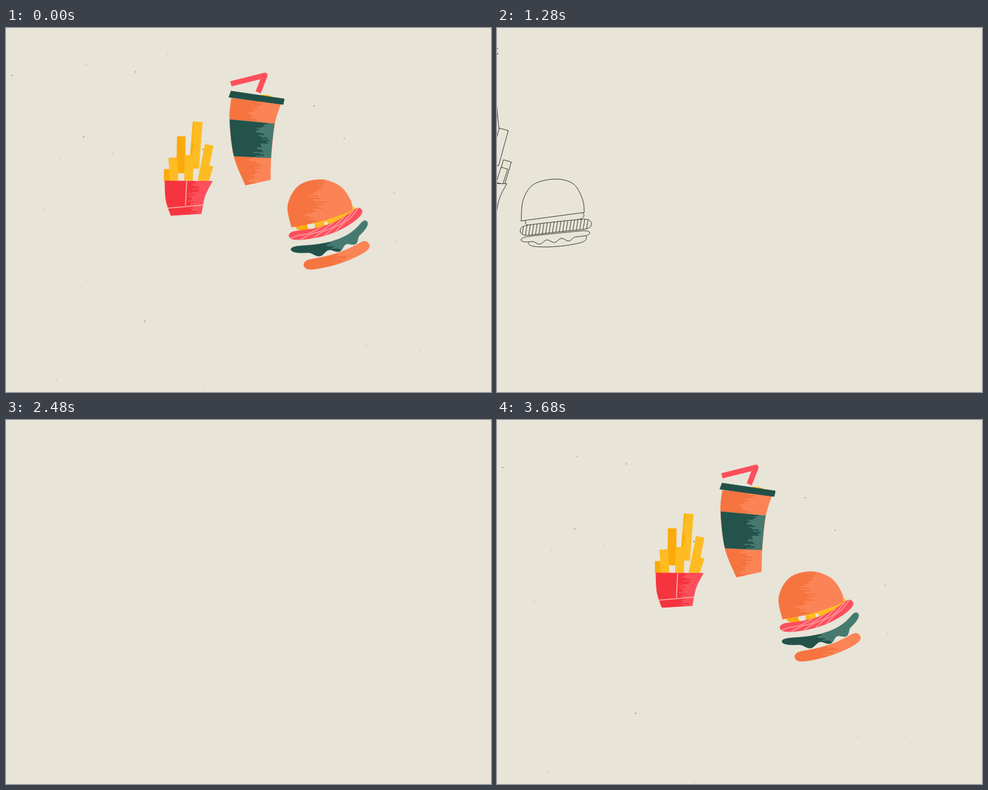
These frames come from a looping animation (800x600 px, 3.72 s). An HTML page with a canvas:

```html
<!DOCTYPE html>
<html lang="en">
<head>
<meta charset="utf-8">
<title>Hopping lunch</title>
<style>
html, body { margin: 0; width: 100%; height: 100%; overflow: hidden; background: #e8e4d8; }
canvas { display: block; width: 800px; height: 600px; }
</style>
</head>
<body>
<canvas id="stage" width="800" height="600"></canvas>
<script>
const ctx = document.getElementById('stage').getContext('2d');
const PAPER = '#e8e4d8', INK = '#2c2e28';
const ORANGE = ['#fb8456', '#f5743f'], GREEN = ['#467a70', '#215049'];
const RED = ['#fd4f5b', '#f5343e'], YELLOW = ['#febc22', '#faaa0a'];
const STEP = 40, STEPS = 93;
let sketch = false;

const lerp = (a, b, k) => a + (b - a) * k;
const mix = (p, q, k) => [lerp(p[0], q[0], k), lerp(p[1], q[1], k)];
const hash = (i, seed) => {
  const s = Math.sin(i * 127.1 + seed * 311.7) * 43758.5453;
  return s - Math.floor(s);
};

// A pose is a set of points around a centre, plus layer thicknesses.
function pose(cx, cy, n, w = []) {
  const p = [];
  for (let i = 0; i < n.length; i += 2) p.push([n[i] - cx, n[i + 1] - cy]);
  return { p, w };
}
function patch(base, at, pts) {
  const p = base.p.slice();
  p.splice(at, pts.length, ...pts);
  return { p, w: base.w };
}

// Burger: dome 8 points, then cheese, patty, lettuce, base with 3 each.
const bunClosed = pose(96, 305, [
  40, 318, 43, 284, 60, 258, 96, 249, 126, 257, 141, 282, 144, 304, 92, 311,
  52, 320, 95, 316, 138, 309, 46, 334, 97, 328, 148, 323,
  44, 349, 98, 343, 149, 338, 58, 353, 100, 353, 141, 346], [12, 17, 9, 14]);
const bunTall = pose(210, 410, [
  160, 436, 148, 372, 156, 327, 177, 313, 205, 325, 230, 366, 247, 404, 205, 425,
  175, 440, 210, 430, 240, 415, 169, 452, 211, 439, 251, 425,
  154, 470, 224, 470, 271, 430, 190, 491, 222, 486, 254, 473], [6, 36, 15, 28]);
const bunOpen = pose(530, 325, [
  471, 328, 465, 292, 483, 260, 519, 250, 551, 261, 568, 284, 571, 300, 524, 317,
  486, 325, 528, 322, 566, 301, 475, 342, 535, 331, 581, 303,
  478, 365, 550, 354, 592, 322, 500, 390, 550, 379, 592, 359], [18, 15, 12, 17]);

// Cup: left side 4, right side 4, lid 4, straw tip, corner, foot.
const cupFall = pose(5, 145, [
  -42, 88, -36, 127, -28, 185, -20, 230, 41, 69, 44, 108, 49, 169, 54, 212,
  -48, 70, 35, 49, 39, 59, -46, 82, -60, 30, -25, 10, -12, 62]);
const cupRise = patch(cupFall, 12, [[45, -83], [-7, -79], [-2, -59]]);
const cupOpen = pose(412, 182, [
  372, 116, 369, 151, 376, 211, 395, 259, 453, 125, 443, 158, 437, 214, 436, 250,
  371, 104, 459, 117, 457, 126, 368, 114, 371, 92, 427, 78, 416, 106]);
const cupLand = pose(728, 395, [
  681, 337, 693, 381, 692, 443, 685, 477, 774, 323, 776, 379, 763, 446, 742, 490,
  674, 327, 776, 313, 779, 322, 675, 338, 706, 370, 716, 293, 728, 318]);

// Fries: box left 3, right 3, creases 4, then 7 sticks as pairs.
const friesTop = pose(300, 280, [
  262, 252, 264, 284, 272, 309, 340, 253, 328, 277, 322, 306,
  298, 251, 296, 292, 267, 297, 324, 292,
  289, 179, 288, 239, 316, 155, 310, 231, 267, 233, 267, 252, 302, 210, 301, 252,
  335, 193, 323, 252, 336, 227, 328, 252, 275, 214, 277, 252]);
const friesIn = patch(patch(friesTop, 12, [[35, -117], [19, -59]]), 18, [[41, -65], [30, -28]]);
const friesFall = pose(25, 347, [
  -16, 323, 0, 352, 11, 376, 52, 319, 57, 346, 61, 374,
  20, 320, 31, 355, 3, 361, 59, 356,
  -30, 190, -32, 250, 5, 160, -3, 237, -32, 270, -30, 314, 4, 262, 7, 313,
  27, 204, 22, 266, 41, 266, 44, 312, -16, 262, -14, 313]);
const friesLand = pose(453, 490, [
  411, 472, 424, 489, 424, 513, 495, 471, 486, 490, 488, 513,
  454, 471, 453, 498, 424, 500, 487, 498,
  413, 306, 408, 366, 473, 297, 437, 363, 389, 351, 402, 397, 431, 364, 435, 417,
  468, 353, 456, 413, 478, 386, 466, 431, 414, 400, 428, 447]);
const friesUp = patch(friesLand, 10, pose(452, 489, [
  410, 307, 407, 364, 469, 281, 436, 344, 392, 348, 396, 400, 428, 361, 432, 412,
  459, 343, 449, 399, 478, 377, 464, 425, 413, 399, 427, 445]).p);

// time, pose, x, y, scale x, scale y, turn
const burgerKeys = [
  [-800, bunTall, -130, 480, 1, 1, .9], [-720, bunTall, -57, 412, 1, 1, .87],
  [-520, bunClosed, 96, 305], [-400, bunTall, 210, 410],
  [-330, bunClosed, 275, 474, 1.15, .7], [-270, bunClosed, 294, 480, 1.25, .62],
  [-200, bunTall, 340, 410, 1, .9, .5], [0, bunOpen, 530, 325],
  [200, bunTall, 740, 405, 1, .9], [290, bunClosed, 835, 478, 1.2, .65],
  [400, bunTall, 1000, 400]];
const cupKeys = [
  [-640, cupRise, -170, 190], [-520, cupRise, -43, 121], [-400, cupFall, 5, 145],
  [-280, cupFall, 105, 310], [-220, cupLand, 165, 412], [-170, cupLand, 202, 420, 1.05, .94],
  [-90, cupOpen, 310, 240], [0, cupOpen, 412, 182], [220, cupOpen, 640, 285],
  [320, cupLand, 724, 393], [360, cupLand, 728, 395], [440, cupOpen, 800, 330],
  [540, cupFall, 960, 250]];
const friesKeys = [
  [-640, friesTop, -120, 330], [-520, friesIn, -24, 284], [-400, friesFall, 25, 347],
  [-320, friesUp, 80, 486], [-260, friesLand, 125, 492], [-160, friesTop, 200, 360, .9, 1.1],
  [-80, friesTop, 255, 293], [0, friesTop, 300, 280], [140, friesTop, 380, 315],
  [240, friesFall, 428, 420], [320, friesUp, 452, 489], [360, friesLand, 453, 490],
  [410, friesTop, 472, 490, 1.12, .8], [470, friesTop, 580, 380, .9, 1.15],
  [560, friesTop, 790, 330], [600, friesTop, 890, 340]];

function spline(keys, i, c, u) {
  const a = keys[i], b = keys[i + 1];
  const p = keys[Math.max(i - 1, 0)], q = keys[Math.min(i + 2, keys.length - 1)];
  const d = b[0] - a[0], k = (u - a[0]) / d, k2 = k * k, k3 = k2 * k;
  const ma = (b[c] - p[c]) / (b[0] - p[0]) * d, mb = (q[c] - a[c]) / (q[0] - a[0]) * d;
  return (2 * k3 - 3 * k2 + 1) * a[c] + (k3 - 2 * k2 + k) * ma + (3 * k2 - 2 * k3) * b[c] + (k3 - k2) * mb;
}
function poseAt(keys, u) {
  u = Math.min(Math.max(u, keys[0][0]), keys[keys.length - 1][0]);
  let i = 0;
  while (i < keys.length - 2 && u >= keys[i + 1][0]) i++;
  const [t0, A, , , ax = 1, ay = 1, ar = 0] = keys[i];
  const [t1, B, , , bx = 1, by = 1, br = 0] = keys[i + 1];
  const k = (u - t0) / (t1 - t0), sx = lerp(ax, bx, k), sy = lerp(ay, by, k), r = lerp(ar, br, k);
  const x = spline(keys, i, 2, u), y = spline(keys, i, 3, u), c = Math.cos(r), s = Math.sin(r);
  const p = A.p.map((pt, j) => {
    const [px, py] = mix(pt, B.p[j], k);
    return [x + px * sx * c - py * sy * s, y + px * sx * s + py * sy * c];
  });
  return { x, y, p, w: A.w.map((w, j) => lerp(w, B.w[j], k) * sy) };
}

function smooth(pts, n = 8) {
  const out = [], last = pts.length - 1;
  for (let i = 0; i < last; i++) {
    const [a, b, c, d] = [pts[Math.max(i - 1, 0)], pts[i], pts[i + 1], pts[Math.min(i + 2, last)]];
    for (let j = 0; j < n; j++) {
      const t = j / n;
      out.push([0, 1].map(m => b[m] + .5 * t * (c[m] - a[m] +
        t * (2 * a[m] - 5 * b[m] + 4 * c[m] - d[m] + t * (3 * (b[m] - c[m]) + d[m] - a[m])))));
    }
  }
  out.push(pts[last]);
  return out;
}
// Quadratic arc passing through m halfway.
function arc(a, m, b, t) {
  const c = [0, 1].map(i => 2 * m[i] - (a[i] + b[i]) / 2);
  return mix(mix(a, c, t), mix(c, b, t), t);
}
function trace(pts, close) {
  ctx.beginPath();
  pts.forEach(p => ctx.lineTo(p[0], p[1]));
  if (close) ctx.closePath();
}
function pencil() {
  ctx.strokeStyle = INK;
  ctx.globalAlpha = .75;
  ctx.lineWidth = 1;
  ctx.stroke();
  ctx.save();
  ctx.translate(.6, .5);
  ctx.globalAlpha = .35;
  ctx.stroke();
  ctx.restore();
  ctx.globalAlpha = 1;
}
function line(pts, color, width) {
  trace(pts);
  if (sketch) return pencil();
  ctx.strokeStyle = color;
  ctx.lineWidth = width;
  ctx.stroke();
}
// Filled shape with a dry-brush shade reaching in from the left.
function paint(pts, [light, dark], seed, amount = .5) {
  trace(pts, true);
  ctx.fillStyle = sketch ? PAPER : light;
  ctx.fill();
  if (sketch) return pencil();
  ctx.strokeStyle = light;
  ctx.lineWidth = 1;
  ctx.stroke();
  if (!amount) return;
  const xs = pts.map(p => p[0]), ys = pts.map(p => p[1]);
  const x = Math.min(...xs), y = Math.min(...ys), w = Math.max(...xs) - x, h = Math.max(...ys) - y;
  ctx.save();
  ctx.clip();
  ctx.fillStyle = dark;
  for (let i = 0; i * 2 < h; i++) {
    const drift = Math.sin(i * .35 + seed) * .08;
    ctx.fillRect(x - 1, y + i * 2, w * (amount + drift + (hash(i, seed) - .5) * .2), 2.2);
  }
  ctx.restore();
}
function inside(pts, draw) {
  ctx.save();
  trace(pts, true);
  ctx.clip();
  draw();
  ctx.restore();
}
// Rounded band along an arc; waves hang from its lower side.
function strip(a, m, b, w, wave = 0) {
  const len = Math.hypot(b[0] - a[0], b[1] - a[1]), e = .45 * w / len, top = [], low = [];
  for (let i = 0; i <= 50; i++) {
    const s = -Math.cos(Math.PI * i / 50), t = lerp(-e, 1 + e, (s + 1) / 2);
    const p = arc(a, m, b, t), q = arc(a, m, b, t + .01);
    const dx = q[0] - p[0], dy = q[1] - p[1], d = Math.hypot(dx, dy) || 1;
    const h = w / 2 * Math.sqrt(1 - Math.min(1, s ** 12));
    const g = h + (t > .12 && t < .8 ? wave * Math.sin((t - .12) / .68 * Math.PI * 3) ** 2 : 0);
    top.push([p[0] + dy / d * h, p[1] - dx / d * h]);
    low.unshift([p[0] - dy / d * g, p[1] + dx / d * g]);
  }
  return top.concat(low);
}

function drawBurger(u) {
  const { p, w } = poseAt(burgerKeys, u);
  paint(strip(p[17], p[18], p[19], w[3]), ORANGE, 3, .5);
  paint(strip(p[14], p[15], p[16], w[2], w[2] * .65), GREEN, 5, .6);
  const [a, m, b] = p.slice(8, 11);
  paint(strip(a, m, b, w[0]), YELLOW, 2, .3);
  if (!sketch && w[0] > 13) {
    ctx.fillStyle = PAPER;
    for (const [t, r] of [[.2, 6.5], [.5, 3]]) {
      const h = arc(a, m, b, t);
      ctx.beginPath();
      ctx.arc(h[0], h[1], r, 0, 7);
      ctx.fill();
    }
  }
  const [c, n, d] = p.slice(11, 14), patty = strip(c, n, d, w[1]);
  paint(patty, RED, 4, 0);
  inside(patty, () => {
    const h = w[1] / 2;
    const at = (t, o) => { const q = arc(c, n, d, t); return [q[0], q[1] + o * h]; };
    if (sketch) {
      for (let t = -.05; t < 1.05; t += .055) line([at(t, 1.1), at(t + .03, -1.1)]);
    } else {
      for (let i = 0; i < 5; i++) {
        const s = i * .17 - .1;
        line(smooth([at(s, 1.1), at(s + .14, .1), at(s + .3, -.2), at(s + .5, -1.2)]), '#ff9aa2', 1.6);
      }
    }
  });
  const dome = smooth(p.slice(0, 7));
  for (let t = .1; t < 1; t += .1) dome.push(arc(p[6], p[7], p[0], t));
  paint(dome, ORANGE, 1, .45);
}

function drawCup(u) {
  const { x, y, p } = poseAt(cupKeys, u);
  const mid = mix(p[0], p[4], .5), drink = [];
  for (let a = 0; a < 6.2; a += .3) drink.push([mid[0] + 13 + 15 * Math.cos(a), mid[1] - 4 + 6 * Math.sin(a)]);
  paint(drink, YELLOW, 1, 0);
  const body = smooth(p.slice(0, 4)).concat(smooth(p.slice(4, 8)).reverse());
  paint(body, ORANGE, 7, .5);
  if (sketch) {
    line([p[1], p[5]]);
    line([p[2], p[6]]);
  } else {
    inside(body, () => paint([mix(p[1], p[5], -.1), mix(p[1], p[5], 1.1),
      mix(p[2], p[6], 1.1), mix(p[2], p[6], -.1)], GREEN, 8, .7));
  }
  paint(p.slice(8, 12), [GREEN[1], GREEN[1]], 1, 0);
  tube(p.slice(12), RED[0], 9, 'butt');
  if (u >= 240 && u <= 440) drawSplash((x - 728) * .9, (y - 395) * .7);
}
function tube(pts, color, w, cap = 'round') {
  ctx.lineCap = cap;
  trace(pts);
  if (sketch) {
    ctx.strokeStyle = INK;
    ctx.lineWidth = w + 1;
    ctx.stroke();
  }
  ctx.strokeStyle = sketch ? PAPER : color;
  ctx.lineWidth = sketch ? w - 1 : w;
  ctx.stroke();
  ctx.lineCap = 'round';
}
const splash = [
  [[608, 276], [619, 284], [628, 302]],
  [[658, 358], [660, 363], [662, 370]],
  [[667, 387], [666, 403], [661, 411], [663, 428], [672, 437]],
  [[703, 378], [700, 406], [684, 434]]];
function drawSplash(dx, dy) {
  for (const s of splash) tube(smooth(s.map(q => [q[0] + dx, q[1] + dy])), YELLOW[0], 5);
}

const stickWidth = [13, 15, 12, 13, 13, 11, 13];
function drawFries(u) {
  const { p } = poseAt(friesKeys, u);
  stickWidth.forEach((w, i) => {
    const a = p[10 + i * 2], b = p[11 + i * 2];
    const dx = b[0] - a[0], dy = b[1] - a[1], d = Math.hypot(dx, dy) || 1;
    const nx = -dy / d * w / 2, ny = dx / d * w / 2;
    paint([[a[0] - nx, a[1] - ny], [a[0] + nx, a[1] + ny], [b[0] + nx, b[1] + ny], [b[0] - nx, b[1] - ny]],
      i === 0 || i === 2 ? [YELLOW[1], YELLOW[1]] : YELLOW, i, i === 1 ? .3 : 0);
  });
  paint(smooth(p.slice(0, 3)).concat(smooth(p.slice(3, 6)).reverse()), RED, 6, .58);
  line([p[6], p[7]], '#fcb0aa', 1.6);
  line([p[8], p[9]], '#fcb0aa', 1.6);
}

function drawGrain(seed) {
  for (let i = 0; i < 150; i++) {
    const big = hash(i, seed + 3.3) ** 6;
    ctx.fillStyle = `rgba(70,70,62,${.12 + big * .45})`;
    ctx.fillRect(hash(i, seed + 1.1) * 800, hash(i, seed + 2.2) * 600, 1 + big, 1 + big * 1.2);
  }
}

function render(now) {
  const n = Math.floor(now / STEP) % STEPS % (STEPS - 1), t = n * STEP;
  ctx.fillStyle = PAPER;
  ctx.fillRect(0, 0, 800, 600);
  ctx.lineJoin = ctx.lineCap = 'round';
  const color = t < 1080 || t >= 2600;
  sketch = !color;
  if (color) drawGrain(n + 1);
  if (color || (t >= 1200 && t < 2440)) {
    const u = sketch ? t - 1800 : t < 1080 ? t : t - 3680;
    drawCup(u);
    drawFries(u);
    drawBurger(u);
  }
}

const start = performance.now();
function loop() {
  render(performance.now() - start);
  requestAnimationFrame(loop);
}
loop();
</script>
</body>
</html>
```
